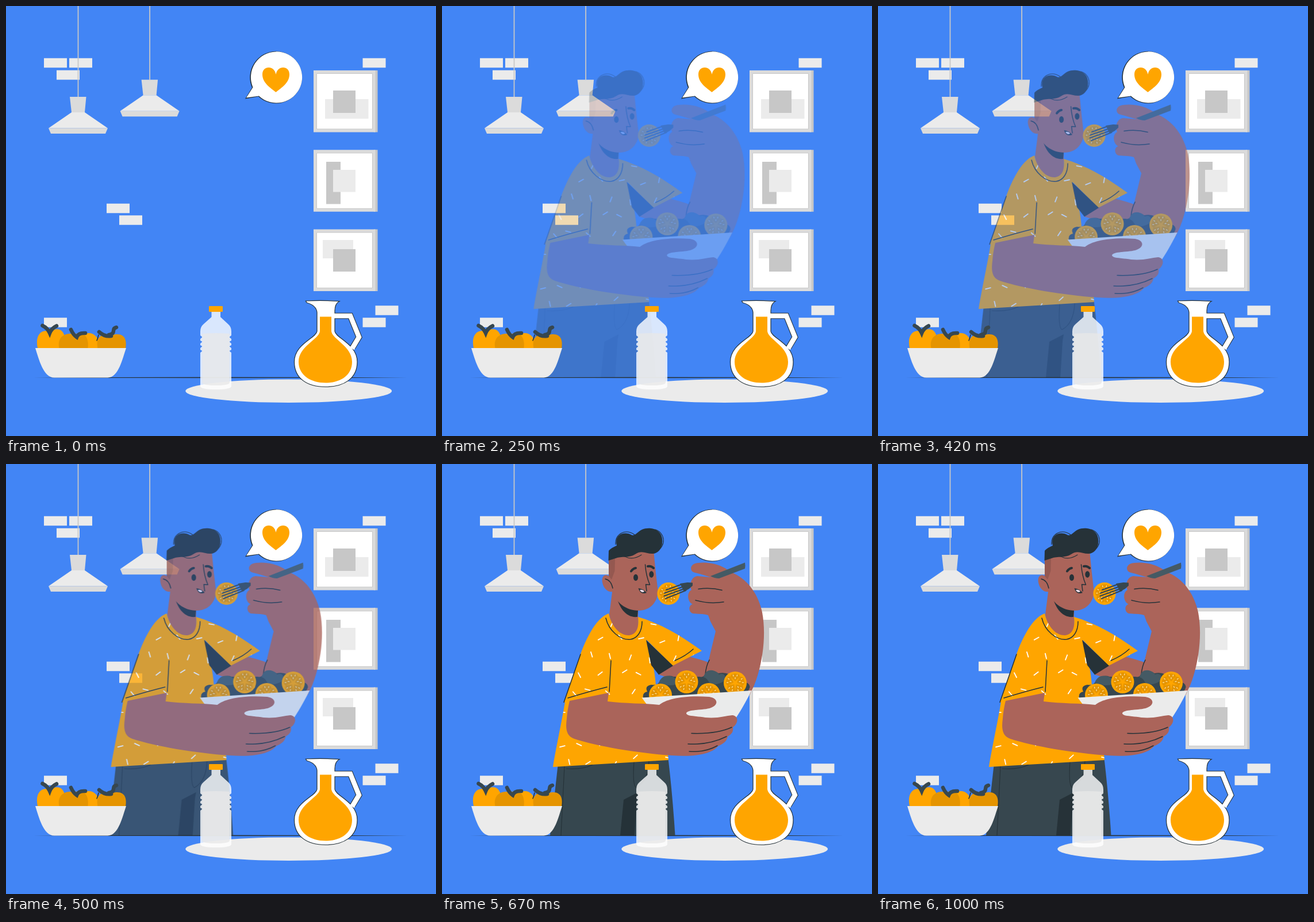
An HTML page that plays this animation: 748x748 px, repeating every 1040 ms.

```html
<!DOCTYPE html>
<html lang="en">
<head>
<meta charset="utf-8">
<title>Lunch</title>
<style>
  html, body { margin: 0; width: 100%; height: 100%; overflow: hidden; background: #4285f5; }
  svg { display: block; width: 100vw; height: 100vh; }
  .light { fill: #ebebeb; }
  .mid { fill: #dbdbdb; }
  .gray { fill: #c7c7c7; }
  .white { fill: #fff; }
  .orange { fill: #ffa500; }
  .amber { fill: #e59400; }
  .skin { fill: #ab645a; }
  .fade { fill: #955850; }
  .dark { fill: #263238; }
  .slate { fill: #37474f; }
  .steel { fill: #455a64; }
  .bricks { fill: none; stroke: #ebebeb; stroke-width: 16.5; }
  .line { fill: none; stroke: #263238; stroke-width: 1.5; stroke-linecap: round; stroke-linejoin: round; }
  .thin { stroke-width: 1.1; }
  .brow { stroke-width: 4; }
  .leaf { fill: none; stroke: #37474f; stroke-width: 6.5; stroke-linecap: round; }
  .tines { fill: none; stroke: #37474f; stroke-width: 2.3; stroke-linecap: round; }
  .seeds { fill: none; stroke: #ffe2a8; stroke-width: 1.3; stroke-linecap: round; }
  .ticks { fill: none; stroke: #fff; stroke-width: 1.8; stroke-linecap: round; }
</style>
</head>
<body>
<svg viewBox="0 0 748 748">
  <defs>
    <g id="lamp">
      <path class="gray" d="M124.6 -40h1.8V158h-1.8z"/>
      <path class="mid" d="M111 158H139.500L137 185H114z"/>
      <path class="light" d="M114 185H137L177 212.500H74z"/>
      <path class="mid" d="M74 212.500H177L173 222H78z"/>
    </g>
    <g id="frame">
      <path class="gray" d="M640 0H646.500V107.500H640z"/>
      <path class="mid" d="M535 0H642.500V107.500H535z"/>
      <path fill="#fff" stroke="#c7c7c7" d="M540.500 5.500H637.500V102H540.500z"/>
    </g>
    <g id="chamber">
      <path class="amber" d="M0 -3L8 -11Q8 -16.500 0 -16.500Q-8 -16.500 -8 -11z"/>
      <path class="seeds" d="M-3 -12l-.6 -2M3 -12l.6 -2M0 -7.500v-2"/>
    </g>
    <g id="tomato">
      <circle class="orange" r="20"/>
      <use href="#chamber"/>
      <use href="#chamber" transform="rotate(72)"/>
      <use href="#chamber" transform="rotate(144)"/>
      <use href="#chamber" transform="rotate(216)"/>
      <use href="#chamber" transform="rotate(288)"/>
    </g>
    <path id="shirt" d="M290 260C266 268 247 312 239 337L212 415L214 414C208 450 198 495 193 527L394 515C390 470 380 425 372 385C370 360 366 340 356 306L401 351L452 325C420 302 385 279 341 266C343 284 339 296 326 298C308 299 294 280 290 260z"/>
    <clipPath id="cloth"><use href="#shirt"/></clipPath>
  </defs>

  <path class="bricks" d="M66 99h40M110 99h40M88 120h40M620.500 99h40M175 352h40M197 372.500h40M642.500 529.500h40M620.500 550.500h40M66 550.500h40"/>
  <use href="#lamp"/>
  <use href="#lamp" x="124.600" y="-29.700"/>

  <use href="#frame" y="112"/>
  <path class="light" d="M555 162h75.500v34H555z"/>
  <path class="gray" d="M569 147h39v39h-39z"/>
  <use href="#frame" y="250.300"/>
  <path class="gray" d="M557 271h25v73.500h-25z"/>
  <path class="light" d="M569 285h39v38.500h-39z"/>
  <use href="#frame" y="388.500"/>
  <path class="light" d="M551 407h53v32h-53z"/>
  <path class="gray" d="M569 423h39v39h-39z"/>

  <path class="dark" d="M48 646.400Q372 644.800 698 646.400Q372 648 48 646.400z"/>

  <!-- speech bubble -->
  <path class="dark" d="M439 157.500A45.300 45.300 0 1 0 428 142L416 161.500z"/>
  <path class="white" d="M440 156.500A44.600 44.600 0 1 0 429.500 141.500L418 159.500z"/>
  <path class="orange" d="M469.500 150C460 142 446 134 446 119C446 111 451 107 457 107C463 107 468 111 469.500 119C471 111 476 107 482 107C488 107 493 111 493 119C493 134 479 142 469.500 150z"/>

  <g id="man">
    <!-- trousers -->
    <path class="slate" d="M202 520L188 646H405.500Q401 575 393 508z"/>
    <path class="dark" d="M341 571L316 584L310 646H335L339 582z"/>
    <path class="line thin" d="M213 526L207 646M216 530Q245 532 262 523M360 516Q359 552 338 563Q331 560 334 518"/>

    <!-- raised arm -->
    <path class="skin" d="M440 189C430 187 430 173 446 172C462 170 480 174 492 181C499 185 500 188 507 190C535 203 551 230 557 258C564 295 559 345 543 385L535 402H470L457 380C420 380 400 374 376 366L400 345L430 335C445 339 455 342 463 345L476 291L467 274L463 263C455 260 445 261 436 260C428 257 429 245 436 244C427 240 425 224 434 219C430 212 432 197 444 195L468 197C458 194 448 191 440 189z"/>
    <path class="line" d="M446 217.500Q466 214 487 219.500M441 237Q465 244 490 240M465 341Q459 352 458 367"/>
    <path class="steel" d="M527 171.500Q528 177 527 182L482 199Q474 199 467 195z"/>

    <!-- neck and shirt -->
    <path class="skin" d="M297 215L291 262C296 290 312 302 326 301C340 299 343 285 341 265V245z"/>
    <path class="dark" d="M303 228C308 246 325 254 341 254L340 266C320 268 308 250 303 228z"/>
    <use class="orange" href="#shirt"/>
    <g clip-path="url(#cloth)"><path id="ticks" class="ticks"/></g>
    <path class="dark" d="M355 306L402 351L377 366.500L364 350z"/>
    <path class="line" d="M285 268C290 290 310 307 328 305C341 303 348 290 348 274M405 342Q424 334 437 322M241 331L212 414.500M219 407Q255 396 287 388M294 342L291 396"/>

    <!-- head -->
    <path class="skin" d="M291 158L290 195C283 190 277 196 279 206C281 217 289 224 298 222C301 240 320 255 342 255C362 255 376 240 375.500 220L372 190L368 150z"/>
    <path class="fade" d="M290 166L301 163L300.500 186L295 201L290 195z"/>
    <path class="line" d="M284 200Q294 202 297 216"/>
    <path class="dark" d="M289.500 168L290 151C293 147 299 144 304 142C299 124 316 115 331 124C337 124 340 118 348 114C360 109 381 112 383 130C385 146 376 156 366 156C355 156 347 149 336 157C325 164 312 160 302 164z"/>
    <path class="line thin" d="M302 140C301 121 319 112 335 123M371 114C388 119 391 143 373 152M318 161Q332 168 347 158"/>
    <path class="line brow" d="M329 186.500Q332 182 337 181M358 178Q364 177 368 181"/>
    <ellipse class="dark" cx="337" cy="197.500" rx="4" ry="5.800"/>
    <ellipse class="dark" cx="364.300" cy="192" rx="4" ry="5.800"/>
    <path class="line" d="M353.500 175Q355 195 361.500 210L354.500 209.500L356 221"/>
    <path class="dark" d="M341.500 216Q345 228 356 224Q350 217 341.500 216z"/>
    <path fill="#eed9e4" d="M344 219Q350 218 352 222Q347 225 344 219z"/>

    <!-- bite on the fork -->
    <use href="#tomato" transform="translate(394 225.500) scale(.98)"/>
    <path class="slate" d="M414 208L427 206L436 206.500V211.500L430 217L421 222z"/>
    <path class="tines" d="M390 219L418 209M387 224.500L421 213M386.500 229.500L423 216.500M389 234L424 220"/>

    <!-- salad bowl -->
    <path class="slate" d="M350 407Q348 398 357 396Q352 386 364 384Q376 386 379 377Q390 365 403 370H448Q455 372 458 365Q466 355 481 364Q492 362 500 366L524 378Q538 382 535 390L530 400z"/>
    <path class="steel" d="M377 381Q382 366 397 369Q409 370 408 383Q396 388 377 381zM455 371Q458 357 471 359Q479 361 482 366Q494 362 493 376Q480 386 466 382Q460 371 455 371z"/>
    <use href="#tomato" x="380" y="402"/>
    <use href="#tomato" x="464" y="401"/>
    <use href="#tomato" x="425.500" y="379"/>
    <use href="#tomato" x="510" y="381"/>
    <path class="light" d="M347.500 406.500L538.500 394C528 415 518 432 506 450L420 450L365 430z"/>

    <!-- front arm -->
    <path class="skin" d="M290 398L288 413C320 417 350 416 378 419C390 409 420 402 465 405C482 408 480 420 468 424C455 429 430 426 425 433C424 439 440 438 458 441C480 443 493 438 505 437C516 438 516 451 506 458C507 466 504 470 497 474C495 485 485 488 480 491C470 504 440 510 400 507C340 503 270 491 230 478C215 473 215 458 217 443C218 430 220 420 222 412z"/>
    <path class="line" d="M434 468.500Q478 470 504 458M428 487Q465 489 495 474M430 500Q458 502 479 490"/>
  </g>

  <ellipse class="light" cx="491.700" cy="669.700" rx="179.500" ry="20.300"/>

  <!-- fruit -->
  <ellipse class="orange" cx="144" cy="587" rx="17" ry="18"/>
  <path class="orange" d="M58 604C48 580 57 560 76 566C91 558 103 562 103 585L98 604z"/>
  <path class="amber" d="M96 604C85 583 97 566 119 571C138 565 147 578 141 604z"/>
  <path class="amber" d="M163 604C152 582 163 566 183 573C204 566 214 578 206 604z"/>
  <path class="leaf" d="M63.500 556Q72 560 76 569Q79 561 88 556.500M113 563Q117 572 123 576Q126 568 138 569M162 567Q172 576 183 574M179 572Q187 571 187 565Q187 560 192 559"/>
  <path class="line" d="M161 572Q160 577 158 582"/>
  <path class="light" d="M51 595H209C203 612 196 646.500 177 646.500H84C65 646.500 57 614 51 595z"/>

  <!-- bottle -->
  <path fill="#fff" fill-opacity=".8" d="M357.500 531.500H373V541L386 553Q392 558 392 566V573l-3.500 3l3.500 3v3l-3.500 2l3.500 3v3l-3.500 2l3.500 3v3l-3.500 2l3.500 3V661Q392 667 365 667Q338 667 338 661V603l3.500 -3l-3.500 -2v-3l3.500 -3l-3.500 -2v-3l3.500 -3l-3.500 -2v-3l3.500 -3l-3.500 -3V566Q338 558 344 553L357.500 541z"/>
  <path fill="#e8e8e8" fill-opacity=".78" d="M341 570Q365 568 389 570V655Q389 660 365 660Q341 660 341 655z"/>
  <rect class="orange" x="353" y="522" width="24" height="10" rx="1"/>

  <!-- jug -->
  <path fill="none" stroke="#263238" stroke-width="10.500" d="M570 539H599L614 576L603 594"/>
  <path fill="#fff" stroke="#263238" stroke-width="1.200" d="M521.500 513Q550 511.500 580 513.500Q572 518 572 530V566C574 578 611 588 611 619C611 648 588 662.500 556 662.500C524 662.500 501.500 648 501.500 619C501.500 588 539 578 541 566V533Q540 521 523 516z"/>
  <path fill="none" stroke="#fff" stroke-width="8.400" d="M569 539H599L614 576L602 596"/>
  <path class="orange" d="M546 540.500H566V566C568 580 602 592 602 619C602 643 581 655.500 556 655.500C531 655.500 509 643 509 619C509 592 544 580 546 566z"/>
</svg>
<script>
  // Shirt pattern: short strokes on a loose staggered grid, cut to the cloth
  let seed = 7;
  const random = () => (seed = seed * 16807 % 2147483647) / 2147483647;
  const spread = size => (random() - .5) * size;
  const GAP = 35, HALF = 4.5;
  let strokes = '';
  for (let row = 0; row < 9; row++) {
    for (let col = 0; col < 8; col++) {
      const x = 190 + (col + row % 2 / 2) * GAP + spread(14);
      const y = 276 + row * 30 + spread(14);
      const angle = random() * Math.PI;
      const dx = HALF * Math.cos(angle), dy = HALF * Math.sin(angle);
      strokes += `M${x - dx} ${y - dy}l${2 * dx} ${2 * dy}`;
    }
  }
  document.getElementById('ticks').setAttribute('d', strokes);

  // Slide in from the left with a small overshoot, at 24 pictures a second
  const LOOP = 1040, TICK = 1000 / 24, LEAD = 13;
  const slide = document.getElementById('man').animate([
    { opacity: 0, transform: 'translateX(-44.9px)' },
    { opacity: 1, transform: 'translateX(0)' }
  ], { duration: 1000, easing: 'cubic-bezier(.36, -.01, .5, 1.38)', fill: 'both' });
  slide.pause();

  const start = performance.now();
  function draw() {
    const t = (performance.now() - start) % LOOP;
    const step = Math.min(24, Math.floor((t + 3.5) / TICK));
    slide.currentTime = step ? Math.min(1000, step * TICK + LEAD) : 0;
    requestAnimationFrame(draw);
  }
  draw();
</script>
</body>
</html>
```
